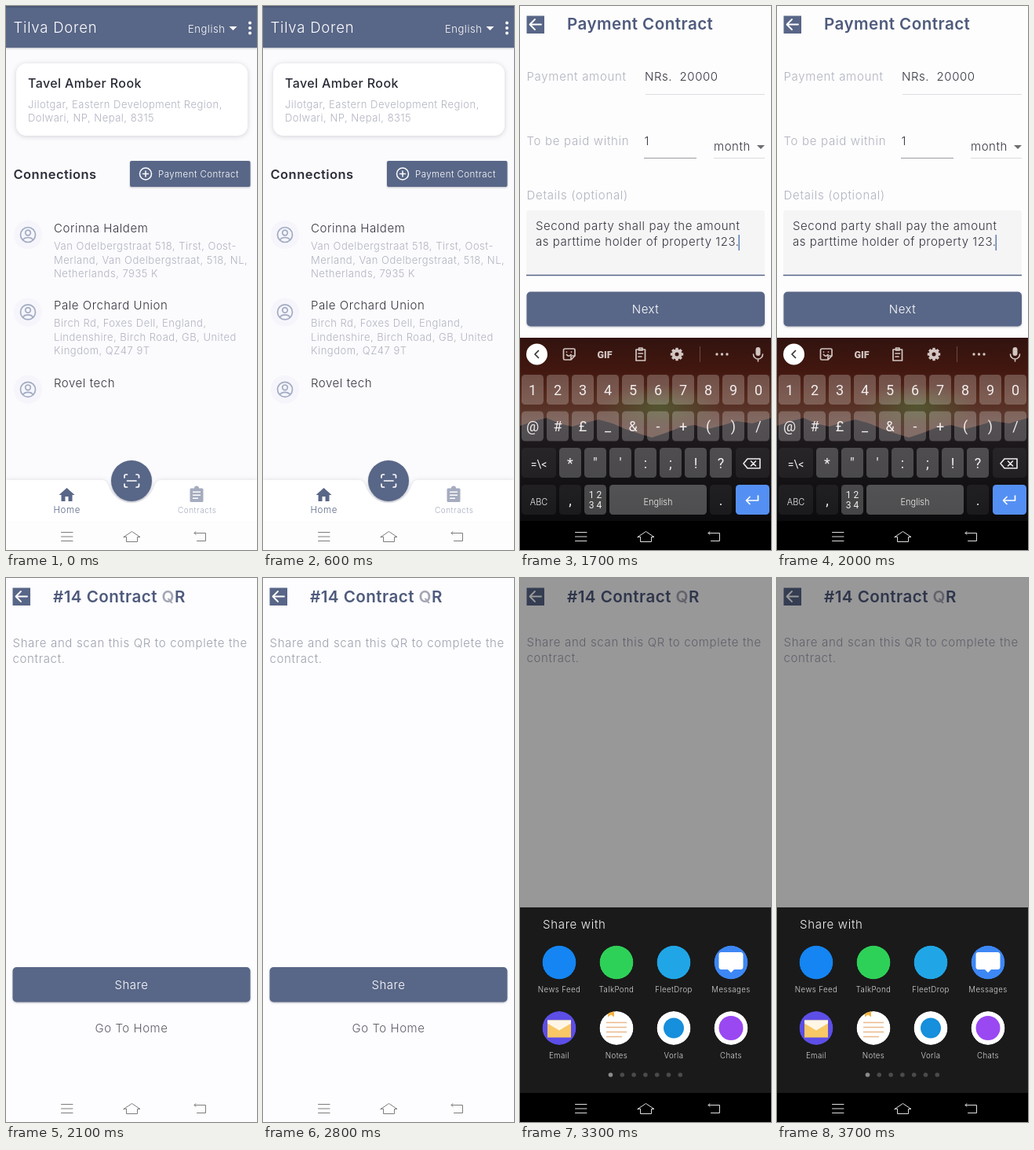
Write an HTML page that moves like this. It is 320 px wide and 692 px high and loops after 3900 ms.

```html
<!DOCTYPE html>
<html lang="en">
<head>
<meta charset="utf-8">
<title>Payment contract flow</title>
<style>
  html, body { margin: 0; width: 100%; height: 100%; overflow: hidden; background: #fcfcfd; }
  svg { display: block; width: 100%; height: 100%; }
  text { font: 300 15px Inter, "Open Sans", sans-serif; letter-spacing: .55px; fill: #34363f; }
  .scene { visibility: hidden; animation: 3.9s step-end infinite; }
  #home { animation-name: home; }
  #form { animation-name: form; }
  #done { animation-name: done; }
  #sheet { animation-name: sheet; }
  #note { animation: note 3.9s step-end infinite; }
  @keyframes home { 0% { visibility: visible } 28.205%, 100% { visibility: hidden } }
  @keyframes form { 0% { visibility: hidden } 28.205% { visibility: visible } 53.846%, 100% { visibility: hidden } }
  @keyframes done { 0% { visibility: hidden } 53.846%, 100% { visibility: visible } }
  @keyframes sheet { 0% { visibility: hidden } 76.923%, 100% { visibility: visible } }
  @keyframes note { 0% { transform: none } 76.923%, 100% { transform: translateY(-1px) } }

  .brand { font-size: 18.5px; letter-spacing: .8px; fill: #fff; }
  .lang { font-size: 13px; fill: #fff; }
  .head { font-size: 20.6px; font-weight: 600; letter-spacing: .45px; fill: #4f5b7c; }
  .title { font-size: 16px; font-weight: 500; letter-spacing: .4px; fill: #282a35; }
  .section { font-size: 16.5px; font-weight: 600; letter-spacing: .45px; fill: #2c2e39; }
  .sub { font-size: 13px; letter-spacing: .5px; fill: #b0b3c0; }
  .label { letter-spacing: .7px; fill: #b0b3be; }
  .para { letter-spacing: .65px; fill: #9da1ad; }
  .btn { fill: #fff; text-anchor: middle; }
  .mid { text-anchor: middle; fill: #5c5d66; }
  .small { font-size: 11.5px; letter-spacing: .45px; fill: #fff; }
  .tab { font-size: 11.5px; letter-spacing: .6px; fill: #586687; }
  .tab.off { font-size: 10px; letter-spacing: .5px; fill: #a5acbf; }
  .lead { letter-spacing: .7px; fill: #f4f4f4; }
  .app { font-size: 9.7px; letter-spacing: .4px; fill: #d6d6d6; text-anchor: middle; }
  .key { font: 400 18px Roboto, "Open Sans", sans-serif; letter-spacing: 0; fill: #f1eeee; text-anchor: middle; }
  .line { fill: none; stroke: currentColor; stroke-linecap: round; stroke-linejoin: round; }
  .lift { filter: drop-shadow(0 1px 1px rgba(40, 45, 70, .3)); }
  .soft { filter: drop-shadow(0 1px 3px rgba(40, 45, 70, .2)); }
</style>
</head>
<body>
<svg viewBox="0 0 320 692" preserveAspectRatio="none">
  <defs>
    <linearGradient id="dusk" x1="0" y1="0" x2="0" y2="1">
      <stop offset="0" stop-color="#32130f"/>
      <stop offset=".18" stop-color="#42170f"/>
      <stop offset=".32" stop-color="#552a1d"/>
      <stop offset=".5" stop-color="#5d4139"/>
    </linearGradient>
    <linearGradient id="night" x1="0" y1="0" x2="0" y2="1">
      <stop offset="0" stop-color="#211c20"/>
      <stop offset="1" stop-color="#0b0b0d"/>
    </linearGradient>
    <radialGradient id="glow">
      <stop offset="0" stop-color="#4f6e38" stop-opacity=".6"/>
      <stop offset="1" stop-color="#4f6e38" stop-opacity="0"/>
    </radialGradient>
    <clipPath id="disc"><circle r="21.5"/></clipPath>

    <g id="nav" class="line" stroke-width="1">
      <path d="M70.5 669.5H85M70.5 675H85M70.5 680.5H85"/>
      <path d="M150 675.5L160.5 668.500L171 675.5H167.5V681.5H153.500V675.5Z"/>
      <path d="M242 668.500L240 670.500L242 672.500M240.500 670.500H254.500V680.500H243.500"/>
    </g>
    <g id="back">
      <rect x="8.500" y="12.500" width="22.500" height="22.500" fill="#586687"/>
      <path class="line" color="#fff" stroke-width="1.800" d="M27 23.500H13M19 17L12.500 23.500L19 30"/>
    </g>
    <g id="person" color="#a2abc2">
      <circle r="18" fill="#f5f5fb"/>
      <g class="line" stroke-width="1.700">
        <circle r="9.500"/><circle cy="-2.500" r="3.300"/>
        <path d="M-6.500 6.500C-4 2.500 4 2.500 6.500 6.500"/>
      </g>
    </g>
    <path id="clip" fill="currentColor" fill-rule="evenodd" d="M-7 -7.500H-3A3 3 0 0 1 3 -7.500H7Q8.500 -7.500 8.500 -6V8.500Q8.500 10 7 10H-7Q-8.500 10 -8.500 8.500V-6Q-8.500 -7.500 -7 -7.500ZM-5 -3.500V-2H5V-3.500ZM-5 .5V2H5V.5ZM-5 4.500V6H2V4.500Z"/>
  </defs>

  <g id="home" class="scene">
    <rect width="320" height="692" fill="#fbfbfd"/>
    <rect width="320" height="53" fill="#586687" class="lift"/>
    <rect width="320" height="2" fill="#4a5775"/>
    <text class="brand" x="9.500" y="34">Tilva Doren</text>
    <text class="lang" x="232" y="33.500">English</text>
    <path d="M284.500 26H294.500L289.500 31Z" fill="#fff"/>
    <g fill="#fff"><circle cx="311" cy="21.500" r="2"/><circle cx="311" cy="28" r="2"/><circle cx="311" cy="34.500" r="2"/></g>

    <rect x="13" y="73" width="295" height="92" rx="13" fill="#fff" class="soft"/>
    <text class="title" x="28" y="103.500">Tavel Amber Rook</text>
    <text class="sub" x="28" y="130">Jilotgar, Eastern Development Region,</text>
    <text class="sub" x="28" y="147">Dolwari, NP, Nepal, 8315</text>

    <text class="section" x="9.500" y="220">Connections</text>
    <rect x="158" y="197" width="153.500" height="33" rx="2" fill="#586687" class="lift"/>
    <path class="line" color="#fff" stroke-width="1.500" d="M170.500 213.500a7.500 7.500 0 1 0 15 0a7.500 7.500 0 1 0 -15 0M174.500 213.500H181.500M178 210V217"/>
    <text class="small" x="194" y="217.500">Payment Contract</text>
    <g id="people"></g>

    <path class="soft" fill="#fff" d="M0 603H122C128 603 129 607 131 611A30.500 30.500 0 0 0 189 611C191 607 192 603 198 603H320V656H0Z"/>
    <rect y="655" width="320" height="37" fill="#fdfdfd"/>
    <circle cx="160" cy="604" r="26" fill="#586687" class="lift"/>
    <path class="line" color="#fff" stroke-width="1.700" d="M154.500 604H166M151 600V598Q151 596 153 596H154.500M166 596H167.500Q169.500 596 169.500 598V600M151 608V610Q151 612 153 612H154.500M166 612H167.500Q169.500 612 169.500 610V608"/>
    <path fill="#586687" d="M77.500 613L87.500 622H84.500V630H79.500V624H75.500V630H70.500V622H67.500Z"/>
    <text class="tab" x="60.500" y="644.500">Home</text>
    <use href="#clip" x="243" y="621" color="#a5acbf"/>
    <text class="tab off" x="219" y="645">Contracts</text>
    <use href="#nav" color="#7d7d7d"/>
  </g>

  <g id="form" class="scene">
    <rect width="320" height="692" fill="#fdfdfe"/>
    <use href="#back"/>
    <text class="head" x="60" y="30">Payment Contract</text>
    <text class="label" x="8.500" y="95">Payment amount</text>
    <text x="159" y="95">NRs.&#160; 20000</text>
    <text class="label" x="8.500" y="177">To be paid within</text>
    <text x="158.500" y="177">1</text>
    <text x="247" y="184">month</text>
    <path d="M302 177H312L307 182Z" fill="#6d6d72"/>
    <path d="M160 112.500H312M247 193.500H312" stroke="#dcdce0"/>
    <path d="M158 193.500H225" stroke="#9b9ca3"/>
    <text class="label" x="8.500" y="246">Details (optional)</text>
    <path d="M8 343V264Q8 260 12 260H308Q312 260 312 264V343Z" fill="#f5f5f6"/>
    <path d="M8 342.500H312" stroke="#586687" stroke-width="1.500"/>
    <text x="20" y="285">Second party shall pay the amount</text>
    <text x="20" y="305">as parttime holder of property 123.</text>
    <rect x="278.500" y="291" width="1.500" height="20" fill="#5f7fb0"/>
    <rect x="8.500" y="363.500" width="303.500" height="44" rx="5" fill="#586687" class="lift"/>
    <text class="btn" x="160" y="391">Next</text>

    <rect y="422" width="320" height="233" fill="url(#dusk)"/>
    <ellipse cx="178" cy="510" rx="75" ry="28" fill="url(#glow)"/>
    <path fill="url(#night)" d="M0 534L18 528L34 524L50 531L66 535L84 530L100 526L118 531L134 538L152 544L168 549L186 543L204 536L222 533L240 538L256 534L276 528L296 531L320 524V655H0Z"/>
    <circle cx="21.500" cy="443" r="13.500" fill="#fff"/>
    <path class="line" color="#333" stroke-width="1.700" d="M23.500 438.500L19 443L23.500 447.500"/>
    <g color="#d2c6c2">
      <path class="line" stroke-width="1.700" d="M57.500 436H68.500Q70 436 70 437.500V445L65 450H57Q55.500 450 55.500 448.500V438Q55.500 436 57.500 436ZM70 445H66.500Q65 445 65 446.500V450M59.500 443.500Q62 447 65 443.500M59.500 440V440.100M65.500 440V440.100"/>
      <text class="key" x="108" y="447.500" style="font-size:12.500px;font-weight:900;fill:#d2c6c2">GIF</text>
      <path class="line" stroke-width="1.700" d="M148 437H159.500V451H148ZM151.500 435H156V438H151.500ZM151 442H156.500M151 446H155"/>
      <g id="gear" transform="translate(200 443)" fill="currentColor"><circle r="4.500" fill="none" stroke="currentColor" stroke-width="4"/></g>
      <path d="M229.500 433V453" stroke="#6d4a42"/>
      <g fill="currentColor"><circle cx="251" cy="443" r="1.700"/><circle cx="257.500" cy="443" r="1.700"/><circle cx="264" cy="443" r="1.700"/></g>
      <rect x="300.500" y="434" width="6" height="11" rx="3" fill="currentColor"/>
      <path class="line" stroke-width="1.600" d="M297.500 443A6 6 0 0 0 309.500 443M303.500 449V452"/>
    </g>
    <g id="keys"></g>
    <path class="line" color="#eee" stroke-width="1.600" d="M290 576H306V588H290L285 582ZM294.500 579L300.500 585M300.500 579L294.500 585"/>
    <path class="line" color="#fff" stroke-width="1.700" d="M303.500 623V629H289M293 624.500L288.500 629L293 633.500"/>
    <rect y="655" width="320" height="37"/>
    <use href="#nav" color="#dedede"/>
  </g>

  <g id="done" class="scene">
    <rect width="320" height="692" fill="#fdfdff"/>
    <use href="#back"/>
    <text class="head" x="60" y="30.500">#14 Contract <tspan fill="#a3a6b3">Q</tspan>R</text>
    <g id="note">
      <text class="para" x="8.500" y="88">Share and scan this QR to complete the</text>
      <text class="para" x="8.500" y="108">contract.</text>
    </g>
    <rect x="8.500" y="495" width="303" height="44.500" rx="5" fill="#586687" class="lift"/>
    <text class="btn" x="160" y="522.500">Share</text>
    <text class="mid" x="160" y="578">Go To Home</text>
    <use href="#nav" color="#7d7d7d"/>
  </g>

  <g id="sheet" class="scene">
    <rect width="320" height="419" fill="#000" opacity=".4"/>
    <rect y="419" width="320" height="236" fill="#1a1a1a"/>
    <text class="lead" x="29" y="446">Share with</text>
    <g id="apps"></g>
    <g id="dots"></g>
    <rect y="655" width="320" height="37"/>
    <use href="#nav" color="#dedede"/>
  </g>
</svg>

<script>
  const fill = (id, parts) => document.getElementById(id).innerHTML += parts.join('');
  const text = (cls, x, y, s, style = '') => `<text class="${cls}" x="${x}" y="${y}" style="${style}">${s}</text>`;

  const people = [
    ['Corinna Haldem', 'Van Odelbergstraat 518, Tirst, Oost-', 'Merland, Van Odelbergstraat, 518, NL,', 'Netherlands, 7935 K'],
    ['Pale Orchard Union', 'Birch Rd, Foxes Dell, England,', 'Lindenshire, Birch Road, GB, United', 'Kingdom, QZ47 9T'],
    ['Rovel tech']
  ];
  fill('people', people.map(([name, ...lines], i) => {
    const y = 288 + 98.4 * i;
    return `<use href="#person" x="28" y="${y + 3}"/>` + text('', 61, y, name) +
      lines.map((s, j) => text('sub', 61, y + 22 + 17.5 * j, s)).join('');
  }));

  fill('gear', Array.from({ length: 8 }, (_, i) =>
    `<rect x="-1.700" y="-8.200" width="3.400" height="4" transform="rotate(${45 * i})"/>`));

  // Keyboard: a key is a rounded plate with an optional caption
  const key = (x, y, w, tone, s = '', style = '') =>
    `<rect x="${x}" y="${y}" width="${w}" height="38" rx="4.500" fill="${tone}"/>` +
    text('key', x + w / 2, y + 25.5, s, style);
  const light = 'rgba(255,255,255,.23)', dim = 'rgba(255,255,255,.06)';
  const row = (chars, x, y) => [...chars].map((c, i) => key(x + 32 * i, y, 28, light, c));
  const ui = 'font:300 11px Inter,sans-serif';
  fill('keys', [
    ...row('1234567890', 2, 469),
    ...row('@#£_&-+()/', 2, 515.5),
    key(2, 562, 44, dim, '=\\&lt;', 'font-size:14px'),
    ...row('*"\':;!?', 50, 562),
    key(275, 562, 43, dim),
    key(2, 609, 44, dim, 'ABC', ui),
    key(50, 609, 28, dim, ','),
    key(82, 609, 28, light),
    text('key', 96, 626, '1 2', 'font-size:12px'),
    text('key', 96, 639, '3 4', 'font-size:12px'),
    key(114, 609, 124, 'rgba(255,255,255,.27)', 'English', ui),
    key(242, 609, 28, dim, '.'),
    key(275, 609, 43, '#5490f3')
  ]);

  const bubble = '<path fill="#fff" d="M-12 -13H12Q15.500 -13 15.500 -9.500V5.500Q15.500 9 12 9H4L0 13L-4 9H-12Q-15.500 9 -15.500 5.500V-9.500Q-15.500 -13 -12 -13Z"/>';
  const mail = '<path fill="#f8c766" d="M-15 -10H15V12H-15Z"/><path fill="#fff6e6" d="M-15 -10H15V-6L0 3L-15 -6Z"/>';
  const notes = '<path fill="#f3b443" d="M-11 -22H-3V-14L-7 -17L-11 -14Z"/><path d="M-13 -7H13M-13 -1H13M-13 5H13M-13 11H7" stroke="#e9b98d" stroke-width="1.500"/>';
  const spot = (r, tone) => `<circle r="${r}" fill="${tone}"/>`;
  const apps = [
    ['News Feed', '#1485f2'], ['TalkPond', '#2ed158'], ['FleetDrop', '#20a6e6'], ['Messages', '#3d87f5', bubble],
    ['Email', '#5c4ee6', mail], ['Notes', '#fff', notes], ['Vorla', '#fff', spot(13, '#168fdc')], ['Chats', '#fff', spot(15.5, '#9a48f2')]
  ];
  fill('apps', apps.map(([name, tone, art = ''], i) => {
    const x = 50 + 73 * (i % 4), y = i < 4 ? 489 : 572.5;
    return `<g transform="translate(${x} ${y})" clip-path="url(#disc)">${spot(21.5, tone)}${art}</g>` +
      text('app', x, y + 38, name);
  }));
  fill('dots', Array.from({ length: 7 }, (_, i) =>
    `<circle cx="${115.5 + 14.8 * i}" cy="632" r="2.800" fill="${i ? '#4b4b4b' : '#8c8c8c'}"/>`));
</script>
</body>
</html>
```
